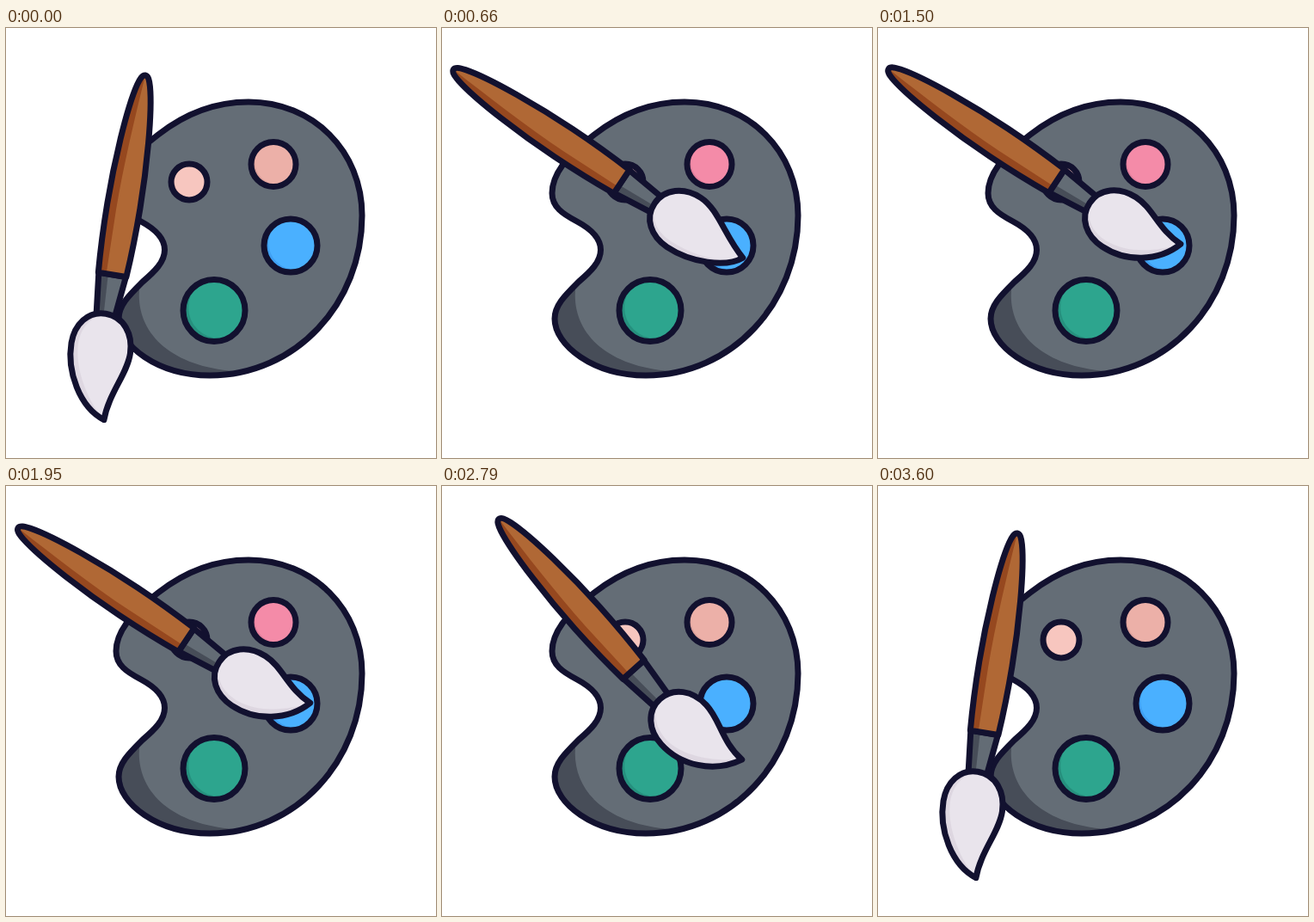
Recreate the animation shown at these times as an HTML page. Size 500 by 500 pixels, loop 3630 ms.

```html
<!DOCTYPE html>
<html lang="en">
<head>
<meta charset="utf-8">
<title>Palette and brush</title>
<style>
html, body { margin: 0; width: 100%; height: 100%; overflow: hidden; background: #fff; }
svg { display: block; width: 100vw; height: 100vh; }
.line { fill: none; stroke: #12112f; stroke-width: 7; stroke-linejoin: round; stroke-linecap: round; }
</style>
</head>
<body>
<svg viewBox="0 0 500 500">
  <defs>
    <path id="board" d="M282 86C357 86 414 143 414 218C414 320 337 404 237 404C176 404 131 369 131 338C131 322 144 310 159 295C173 283 184.500 272 184.500 258C184.500 244 172 233 157 225C140 216 128 208 128 192C128 168 149 145 177 124C209 99 245 86 282 86Z"/>
    <path id="handle" d="M0 0C3.500 0 5.500 5 7.500 12C15.500 42 19.300 109 19.300 154C19.300 184 18 214 16.500 235H-16.500C-18 214 -19.300 184 -19.300 154C-19.300 109 -15.500 42 -7.500 12C-5.500 5 -3.500 0 0 0Z"/>
    <path id="ferrule" d="M-16 235H16L10.500 286H-10.500Z"/>
    <clipPath id="boardClip"><use href="#board"/></clipPath>
    <clipPath id="handleClip"><use href="#handle"/></clipPath>
    <clipPath id="ferruleClip"><use href="#ferrule"/></clipPath>
  </defs>

  <use href="#board" fill="#646d76"/>
  <path clip-path="url(#boardClip)" fill="#474d58" d="M156 296C147 350 187 393 266 399V420H110V296Z"/>
  <use href="#board" class="line"/>
  <g id="paints"></g>

  <g id="brush">
    <use href="#ferrule" fill="#636c75"/>
    <path clip-path="url(#ferruleClip)" fill="#474d58" d="M-20 232H-5L-2 290H-20Z"/>
    <use href="#ferrule" class="line"/>
    <use href="#handle" fill="#b06835"/>
    <path clip-path="url(#handleClip)" fill="#96481f" d="M0 0C-4 50 -8 110 -8 160L-7 240H-24V0Z"/>
    <use href="#handle" class="line"/>
    <path id="hair" fill="#ded7e1"/>
    <path id="shine" fill="#e9e4ec"/>
    <path id="hairLine" class="line"/>
  </g>
</svg>
<script>
const LOOP = 3630, STEP = 30;
const $ = id => document.getElementById(id);

function paint(id, x, y, r, light, dark) {
  $('paints').insertAdjacentHTML('beforeend',
    `<clipPath id="${id}Clip"><circle cx="${x}" cy="${y}" r="${r}"/></clipPath>
     <circle id="${id}Dark" cx="${x}" cy="${y}" r="${r}" fill="${dark}"/>
     <circle id="${id}" cx="${x + r * .17}" cy="${y - r * .1}" r="${r}" fill="${light}" clip-path="url(#${id}Clip)"/>
     <circle class="line" cx="${x}" cy="${y}" r="${r}"/>`);
}
paint('small', 213, 179, 21, '#f7c6bf', '#eeb3ab');
paint('pink', 311, 158.5, 26, '#ecb0a8', '#dda09b');
paint('blue', 331, 253, 31, '#4ab0ff', '#3f9ff2');
paint('green', 242, 328.5, 36, '#2da58e', '#26907e');

const clamp = v => Math.min(1, Math.max(0, v));
const ease = (t, from, to) => (1 - Math.cos(Math.PI * clamp((t - from) / (to - from)))) / 2;

// eased interpolation over rows of [time, ...values]
function track(keys, t) {
  let i = 0;
  while (i < keys.length - 2 && t >= keys[i + 1][0]) i++;
  const a = keys[i], b = keys[i + 1], p = ease(t, a[0], b[0]);
  return a.slice(1).map((v, n) => v + (b[n + 1] - v) * p);
}

const turns = [[0, 9.4], [650, -56.3], [2617, -56.3], [3182, 11.3], [3520, 9.4], [LOOP, 9.4]];
// sideways offset and length of the hair tip
const bends = [[0, 18, 403], [360, -11, 403], [1050, 28, 399], [1400, 19, 395.5], [2560, 19, 395.5],
  [2800, 24, 397], [3030, 16.5, 398], [3240, 13, 401], [3540, 18, 403], [LOOP, 18, 403]];
// angle and place of the handle end
const poses = [[9.4, 162, 55], [-.1, 158.5, 61], [-29, 107, 45], [-56.3, 8, 45]];

// cubic through the four poses
function place(angle) {
  const a = Math.min(angle, 9.4);
  let x = 0, y = 0;
  for (const p of poses) {
    let w = 1;
    for (const q of poses) if (q !== p) w *= (a - q[0]) / (p[0] - q[0]);
    x += w * p[1];
    y += w * p[2];
  }
  return [x, y];
}

function hairPath(k, len) {
  const d = k - 17;
  const right = `M0 281C21 281 35 299 35.5 322C36 346 ${18 + d * .35} ${len - 31} ${k} ${len}`;
  return {
    full: `${right}C${-13 + d * .25} ${len - 10} -34 354 -34 321C-34 299 -21 281 0 281Z`,
    shine: `${right}C${k - 20} ${len - 16} -25 352 -26 321C-26 305 -20 288 0 281Z`
  };
}

function draw(t) {
  const [angle] = track(turns, t);
  let [x, y] = place(angle);
  const stir = 8 * (1 - Math.cos(2 * Math.PI * (t - 1050) / 640)) / 2
    * ease(t, 420, 720) * (1 - ease(t, 2460, 2700));
  x += stir * .83;
  y += stir * .5;
  $('brush').setAttribute('transform', `translate(${x} ${y}) rotate(${angle})`);

  const hair = hairPath(...track(bends, t));
  $('hair').setAttribute('d', hair.full);
  $('hairLine').setAttribute('d', hair.full);
  $('shine').setAttribute('d', hair.shine);

  const rosy = t >= 570 && t < 2760;
  $('pink').setAttribute('fill', rosy ? '#f48ba8' : '#ecb0a8');
  $('pinkDark').setAttribute('fill', rosy ? '#e27d9b' : '#dda09b');
}

const start = performance.now();
function frame() {
  const t = (performance.now() - start) % LOOP;
  draw(Math.floor(t / STEP) * STEP);
  requestAnimationFrame(frame);
}
draw(0);
requestAnimationFrame(frame);
</script>
</body>
</html>
```
